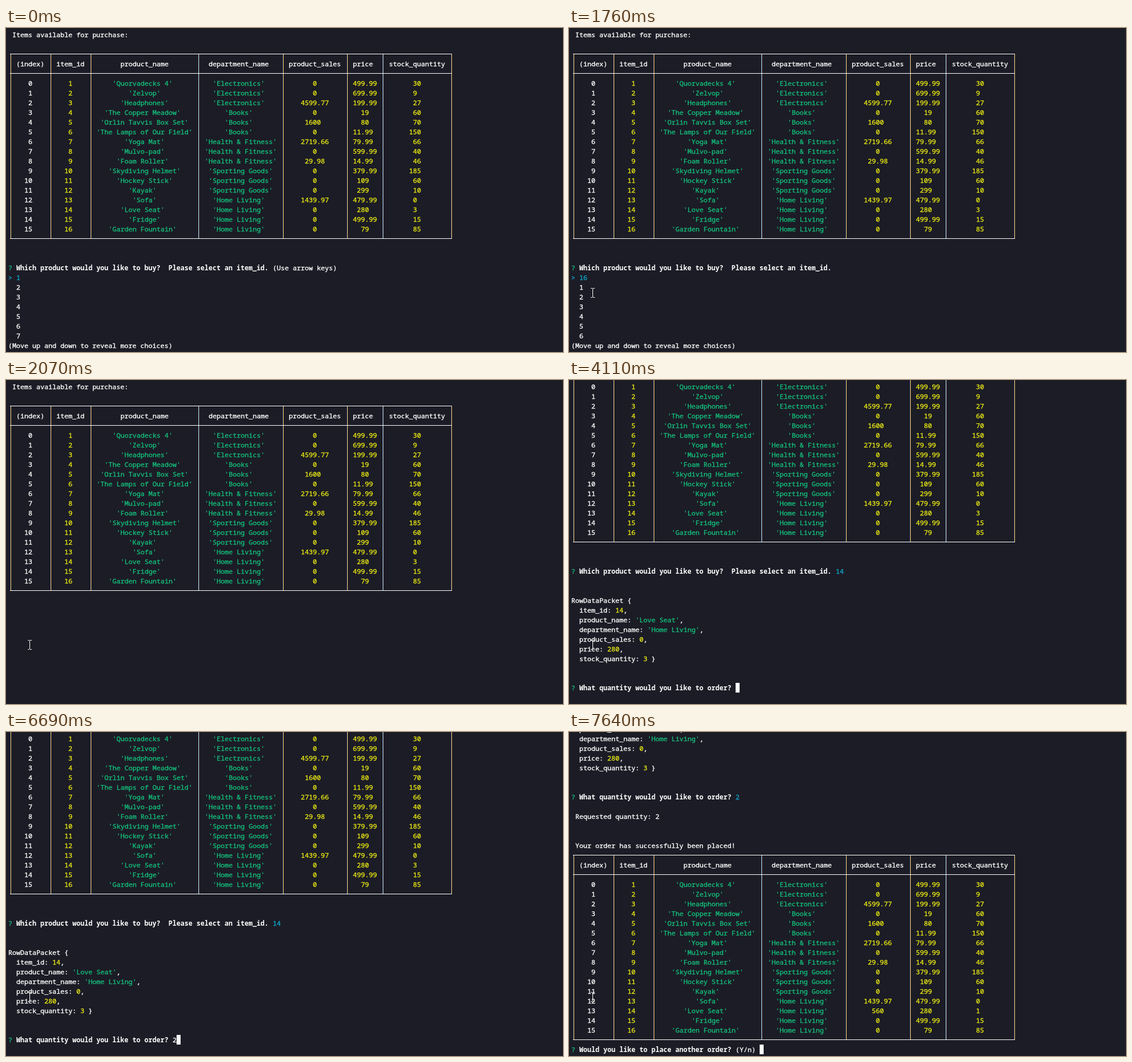
Animation, 973 px wide and 567 px high, one loop 8 s. Source, as an HTML page:

```html
<!DOCTYPE html>
<html lang="en">
<head>
<meta charset="utf-8">
<title>Store terminal</title>
<style>
html, body { margin: 0; width: 100%; height: 100%; overflow: hidden; background: #1c1c26; }
body { position: relative; }
#screen { position: absolute; left: 4px; top: 3px; font: 11.667px/17px "Noto Sans Mono", "DejaVu Sans Mono", monospace; -webkit-text-stroke: .35px; }
#screen * { position: absolute; white-space: pre; }
#mouse { position: absolute; left: 0; top: 0; }
.w { color: #fff; }
.b { color: #fff; font-weight: 700; -webkit-text-stroke: 0; }
.y { color: #e9e914; }
.g { color: #14bf7b; }
.c { color: #11a8cd; }
.block { width: 7px; height: 17px; background: #fff; }
.line { height: 1px; background: #fff; }
/* rules are two pixels wide, with the colour fringe of subpixel smoothing */
.gold, .sky { width: 2px; }
.gold { background: linear-gradient(90deg, #1f2d70 50%, #ffd257 50%); }
.sky { background: linear-gradient(90deg, #a0dcff 50%, #58382f 50%); }
</style>
</head>
<body>
<div id="screen"></div>
<svg id="mouse" width="7" height="17" fill="none" stroke="#fff">
  <path d="M0 .5h3M4 .5h3M3.5 1v15M0 16.5h3M4 16.5h3"/>
</svg>
<script>
const LOOP = 8000, CELL = 7, ROW = 17;
const screenEl = document.getElementById('screen');
const mouse = document.getElementById('mouse');

const edges = [0, 10, 20, 47, 68, 84, 93, 110];
const skyEdges = [47, 93];
const headers = ['(index)', 'item_id', 'product_name', 'department_name', 'product_sales', 'price', 'stock_quantity'];
const items = `Quorvadecks 4|Electronics|0|499.99|30
Zelvop|Electronics|0|699.99|9
Headphones|Electronics|4599.77|199.99|27
The Copper Meadow|Books|0|19|60
Orlin Tavvis Box Set|Books|1600|80|70
The Lamps of Our Field|Books|0|11.99|150
Yoga Mat|Health & Fitness|2719.66|79.99|66
Mulvo-pad|Health & Fitness|0|599.99|40
Foam Roller|Health & Fitness|29.98|14.99|46
Skydiving Helmet|Sporting Goods|0|379.99|185
Hockey Stick|Sporting Goods|0|109|60
Kayak|Sporting Goods|0|299|10
Sofa|Home Living|1439.97|479.99|0
Love Seat|Home Living|0|280|3
Fridge|Home Living|0|499.99|15
Garden Fountain|Home Living|0|79|85`.split('\n').map(s => s.split('|'));

const escapeText = s => String(s).replace(/&/g, '&amp;').replace(/>/g, '&gt;');
const put = (col, row, text, cls = 'w') =>
  `<span class="${cls}" style="left:${col * CELL}px;top:${row * ROW}px">${escapeText(text)}</span>`;
const block = (col, row) => put(col, row, '', 'block');

function table(top, rows) {
  let html = '';
  const cell = (i, row, text, cls) => {
    const room = edges[i + 1] - edges[i] - 1;
    html += put(edges[i] + 1 + Math.floor((room - text.length) / 2), row, text, cls);
  };
  headers.forEach((h, i) => cell(i, top + 1, h, 'w'));
  rows.forEach(([name, dept, ...numbers], n) => {
    const texts = [`${n}`, `${n + 1}`, `'${name}'`, `'${dept}'`, ...numbers];
    texts.forEach((s, i) => cell(i, top + 3 + n, s, 'wyggyyy'[i]));
  });
  const y = top * ROW + 8;
  for (const e of edges)
    html += `<i class="${skyEdges.includes(e) ? 'sky' : 'gold'}" style="left:${e * CELL + 3}px;top:${y}px;height:${19 * ROW + 1}px"></i>`;
  for (const r of [0, 2, 19])
    html += `<i class="line" style="left:3px;top:${y + r * ROW}px;width:${110 * CELL + 2}px"></i>`;
  return html;
}

const ask = (row, text) => put(0, row, '?', 'g') + put(2, row, text, 'b');
const askItem = () => ask(24, 'Which product would you like to buy?  Please select an item_id.');

function choices(first) {
  let html = askItem() + put(0, 25, '>', 'c');
  for (let i = 0; i < 7; i++)
    html += put(2, 25 + i, (first + i - 1) % 16 + 1, i ? 'w' : 'c');
  return html + put(0, 32, '(Move up and down to reveal more choices)');
}

function packet() {
  let html = askItem() + put(66, 24, '14', 'c') + put(0, 27, 'RowDataPacket {');
  const [name, dept, sales, price, stock] = items[13];
  ['14', `'${name}'`, `'${dept}'`, sales, price, stock].forEach((value, i) => {
    const label = headers[i + 1] + ': ', row = 28 + i, col = 2 + label.length;
    html += put(2, row, label) + put(col, row, value, value[0] === "'" ? 'g' : 'y')
      + put(col + value.length, row, i < 5 ? ',' : ' }');
  });
  return html + ask(36, 'What quantity would you like to order?');
}

const intro = put(1, 0, 'Items available for purchase:') + table(2, items);
const chosen = intro + packet();
const requested = chosen + put(41, 36, '2', 'c') + put(1, 38, 'Requested quantity: 2');
const sold = items.map((r, i) => i === 13 ? [r[0], r[1], '560', r[3], '1'] : r);

// start time, scrolled rows, content
const scenes = [
  [0, 0, intro + choices(1) + put(66, 24, '(Use arrow keys)')],
  [1760, 0, intro + choices(16)],
  [2070, 0, intro],
  [2100, 0, intro + choices(15)],
  [2450, 0, intro + choices(14)],
  [4110, 5, chosen + block(41, 36)],
  [6690, 5, chosen + put(41, 36, '2') + block(42, 36)],
  [7580, 9, requested + block(0, 40)],
  [7640, 30, requested + put(1, 41, 'Your order has successfully been placed!') + table(42, sold)
    + ask(62, 'Would you like to place another order?') + put(41, 62, '(Y/n)') + block(47, 62)]
];

const mix = (a, b, u) => Math.round(a + (b - a) * u * u * (3 - 2 * u));

function moveMouse(t) {
  mouse.style.visibility = t < 130 ? 'hidden' : 'visible';
  const u = Math.min(21, Math.max(0, Math.floor((t - 130) / 35.2))) / 21;
  let x, y;
  if (t >= 970) [x, y] = [38, 455];
  else if (u < .75) [x, y] = [mix(737, 29, u / .75), mix(528, 451, u / .75)];
  else [x, y] = [mix(29, 39, (u - .75) * 4), mix(451, 455, (u - .75) * 4)];
  mouse.style.transform = `translate(${x}px,${y}px)`;
}

const start = performance.now();
let shown;
function draw() {
  const t = Math.max(0, performance.now() - start) % LOOP;
  const scene = scenes.findLast(s => s[0] <= t);
  if (scene !== shown) {
    shown = scene;
    screenEl.innerHTML = scene[2];
    screenEl.style.transform = `translateY(${-scene[1] * ROW}px)`;
  }
  moveMouse(t);
  requestAnimationFrame(draw);
}
draw();
</script>
</body>
</html>
```
